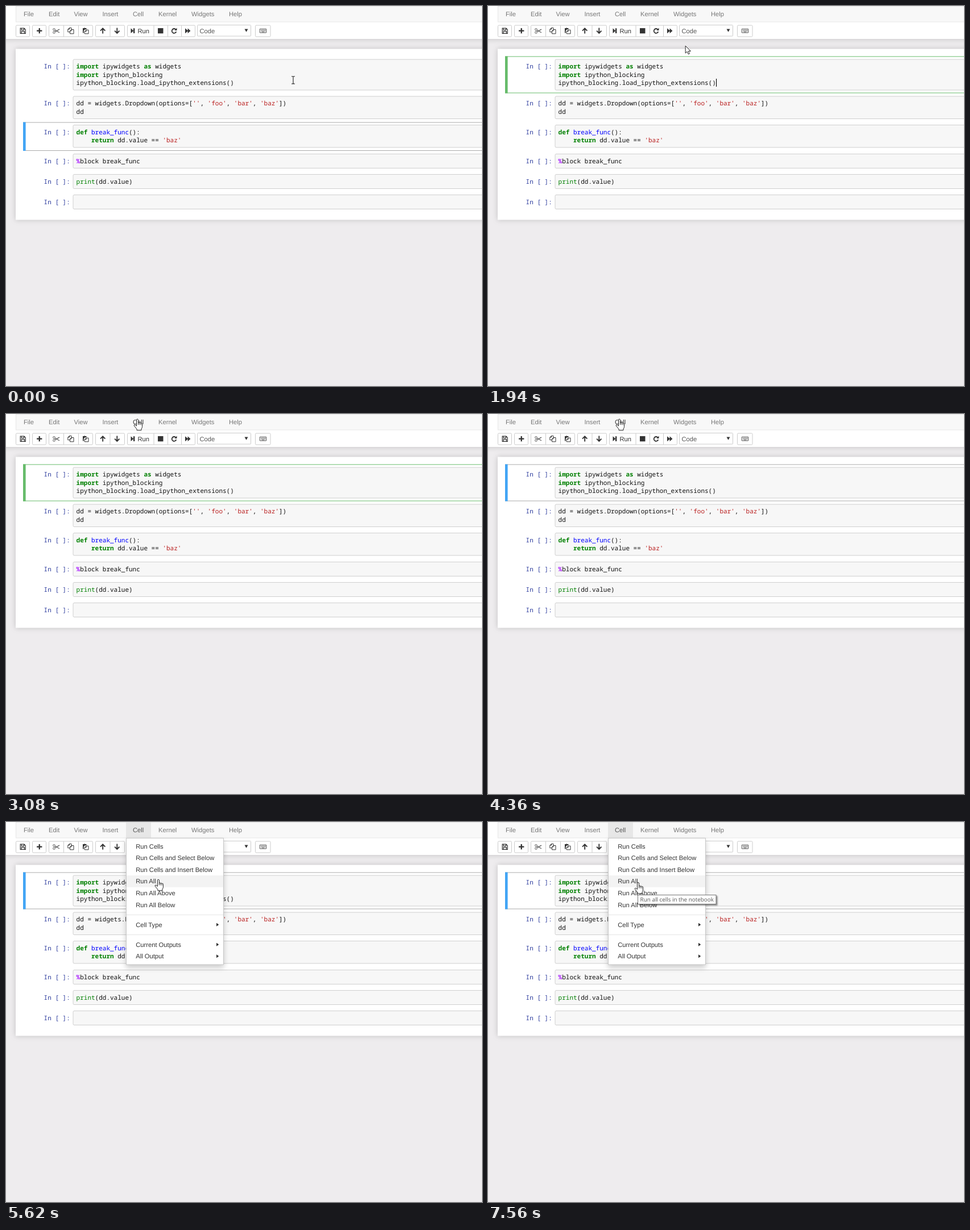
Recreate the animation shown at these times as an HTML page. Size 837 px wide and 669 px high, loop 8 s.

```html
<!DOCTYPE html>
<html lang="en">
<head>
<meta charset="utf-8">
<title>Notebook: run all cells</title>
<style>
html, body { margin: 0; width: 100%; height: 100%; overflow: hidden; background: #eeecee; }
svg { display: block; }
text { font: 11.2px "Liberation Sans", Arial, sans-serif; fill: #333; white-space: pre; text-rendering: geometricPrecision; }
.code { font: 11px "Noto Sans Mono", "DejaVu Sans Mono", monospace; fill: #111; }
.prompt { fill: #303f9f; }
.kw { fill: #008000; font-weight: bold; }
.fn { fill: #00f; }
.str { fill: #ba2121; }
.magic { fill: #a2f; font-weight: bold; }
.bi { fill: #008000; }
.menu { fill: #777; }
.tip { font: 9.9px "Open Sans", "Noto Sans", sans-serif; fill: #575757; }
.shade { filter: drop-shadow(0 0 5px rgba(87,87,87,.3)); }
.drop { filter: drop-shadow(0 5px 5px rgba(0,0,0,.2)); }
.tipbox { filter: drop-shadow(2px 2px 1px rgba(0,0,0,.45)); }
</style>
</head>
<body>
<svg id="stage" width="837" height="669" viewBox="0 0 837 669"></svg>
<script>
const stage = document.getElementById('stage');
const LOOP = 8000;

function el(parent, name, attrs, content) {
  const e = document.createElementNS('http://www.w3.org/2000/svg', name);
  for (const k in attrs) e.setAttribute(k, attrs[k]);
  if (content !== undefined) e.textContent = content;
  parent.appendChild(e);
  return e;
}
const group = (parent = stage, attrs = {}) => el(parent, 'g', attrs);
const rect = (p, x, y, width, height, fill, more = {}) =>
  el(p, 'rect', { x, y, width, height, fill, ...more });
const path = (p, d, more = {}) => el(p, 'path', { d, ...more });
const label = (p, x, y, s, cls = '') => el(p, 'text', { x, y, class: cls }, s);
const show = (e, on) => e.setAttribute('visibility', on ? 'visible' : 'hidden');

// Page and notebook sheet
rect(stage, 0, 0, 837, 669, '#eeecee');
rect(stage, 17, 75.5, 900, 301, '#fff', { class: 'shade' });

// Selection frames
function frame(y, h, bar, line) {
  const g = group();
  rect(g, 30.5, y + .5, 900, h - 1, '#fff', { stroke: line });
  rect(g, 30, y, 4.6, h, bar);
  return g;
}
const third = frame(204.5, 50.5, '#42a5f5', '#ababab');
const edit = frame(88.5, 65, '#66bb6a', '#66bb6a');
const first = frame(88.5, 65, '#42a5f5', '#ababab');

// Cells: top, height, lines of "class:text" tokens
const cells = [
  [94, 54, [
    ['kw:import', ':' + ' ipywidgets ', 'kw:as', ': widgets'],
    ['kw:import', ': ipython_blocking'],
    [':ipython_blocking.load_ipython_extensions()']]],
  [159, 39.5, [
    [':dd = widgets.Dropdown(options=[', "str:''", ':, ', "str:'foo'", ':, ', "str:'bar'", ':, ', "str:'baz'", ':])'],
    [':dd']]],
  [209.5, 39.5, [
    ['kw:def', ': ', 'fn:break_func', ':():'],
    [':    ', 'kw:return', ': dd.value == ', "str:'baz'"]]],
  [260.5, 25, [['magic:%', ':block break_func']]],
  [296.5, 25, [['bi:print', ':(dd.value)']]],
  [332.5, 25, [[]]]
];
for (const [top, h, lines] of cells) {
  rect(stage, 118, top, 900, h, '#f7f7f7', { stroke: '#cfcfcf', rx: 2 });
  label(stage, 66.6, top + 16, 'In [ ]:', 'code prompt');
  lines.forEach((tokens, i) => {
    const t = label(stage, 123.6, top + 16 + i * 14.55, '', 'code');
    for (const token of tokens) {
      const cut = token.indexOf(':');
      el(t, 'tspan', { class: token.slice(0, cut) }, token.slice(cut + 1));
    }
  });
}
const caret = rect(stage, 401, 128, 1.1, 14, '#000');

// Header
rect(stage, -20, -20, 880, 78, '#fff', { class: 'shade' });
rect(stage, 17.5, .5, 900, 27.5, '#f8f8f8', { stroke: '#e7e7e7' });
const openTab = rect(stage, 211, 1, 44, 27, '#e7e7e7');
const menus = {};
[['File', 31], ['Edit', 75], ['View', 119.5], ['Insert', 169.5], ['Cell', 223],
 ['Kernel', 268], ['Widgets', 326], ['Help', 392]]
  .forEach(([name, x]) => menus[name] = label(stage, x, 18, name, 'menu'));

// Toolbar
function buttons(x, w, splits = []) {
  rect(stage, x + .5, 34, w - 1, 20, '#fff', { stroke: '#ccc', rx: 1.5 });
  for (const s of splits) rect(stage, s, 34, 1, 20, '#ccc');
}
buttons(17, 25);
buttons(46, 25);
buttons(75, 78, [101, 127]);
buttons(157, 52, [182.5]);
buttons(213, 120, [259.5, 284, 308]);
buttons(438, 27.5);
rect(stage, 336.5, 33.5, 94, 19.5, '#fff', { stroke: '#ccc', rx: 1 });
label(stage, 340.5, 48, 'Code').style.fill = '#555';
label(stage, 231.5, 47.5, 'Run');

const solid = d => path(stage, d, { fill: '#333' });
const line = (d, w = 1.2, c = '#333') => path(stage, d, { fill: 'none', stroke: c, 'stroke-width': w });
line('M25.2 39.2h6.8l2.3 2.3v6.8h-9.1zM27.3 39.2v3.2h4.2v-3.2M27.2 48.3v-3.6h5.2v3.6');
solid('M57.6 39h2.3v3.5h3.5v2.3h-3.5v3.5h-2.3v-3.5h-3.5v-2.3h3.5z');
line('M86 42.5l8 4.2M86 45.3l8-4.2', 1.2, '#555');
for (const cy of [41.3, 46.5]) el(stage, 'circle', { cx: 84.5, cy, r: 1.8, fill: 'none', stroke: '#555' });
line('M111.5 38.5h3.5v3M108.8 41l2.7-2.5v2.5zM108.8 41v4.7h3.7M115 41.5h4v7.3h-6.5v-5zM115 41.5v2.3h-2.5', 1);
solid('M135 39h2q1-1.5 2.5 0h2v2.2h-2.8l-2 2.2v4.1H135z');
line('M141.2 42.2h3.8v6.6h-6.8v-4zM141.2 42.2v2.6h-3', 1);
line('M170.2 48.6v-9M166 43.6l4.2-4.2l4.2 4.2M195.3 38.6v9M191.1 43.6l4.2 4.2l4.2-4.2', 1.9);
solid('M219.5 39.3l4.5 4.2v-4.2h2.3v8.8h-2.3v-4.2l-4.5 4.2z');
solid('M267 39h9.5v9.3h-9.5z');
line('M298.3 41.1a3.9 3.9 0 1 0 1 4', 1.8);
solid('M296.3 42.9h4.2v-4.3z');
solid('M315 39.2l4.6 4v-4l4.8 4.5l-4.8 4.5v-4l-4.6 4z');
solid('M419.5 40.5h6l-3 5.2z');
line('M446.3 40.4h11.3v6.6h-11.3z', 1, '#555');
line('M448 42.4h8.5M448 44h8.5', .9, '#777');
line('M449.5 45.7h5', .9, '#555');

// Cell menu
const drop = group();
rect(drop, 211.5, 28.5, 171, 222.5, '#fff', { stroke: '#c8c8c8', class: 'drop' });
const hot = rect(drop, 212, 53, 170, 20.6, '#f3f3f3');
['Run Cells', 'Run Cells and Select Below', 'Run Cells and Insert Below',
 'Run All', 'Run All Above', 'Run All Below']
  .forEach((s, i) => label(drop, 228.2, 46.5 + 20.6 * i, s));
[['Cell Type', 184.7], ['Current Outputs', 219.7], ['All Output', 240.3]].forEach(([s, y]) => {
  label(drop, 228.2, y, s);
  path(drop, `M370 ${y - 7}l4.3 3l-4.3 3z`, { fill: '#333' });
});
for (const y of [163, 198]) rect(drop, 212, y, 170, 1, '#e5e5e5');

// Tooltip
const tip = group();
rect(tip, 263.5, 128.5, 137.5, 16, '#fff', { stroke: '#767676', class: 'tipbox' });
label(tip, 267.6, 140, 'Run all cells in the notebook', 'tip');

// Pointers, each with its hot spot at 0,0
const beam = group();
path(beam, 'M-3-6.5h2.2l.8.7l.8-.7H3M0-6V6M-3 6.5h2.2l.8-.7l.8.7H3', { fill: 'none', stroke: '#222', 'stroke-width': 1.1 });
const arrow = group();
path(arrow, 'M.5.3V13.2l3-2.8l2.1 4.6l2.1-.9l-2-4.5h4z', { fill: '#fff', stroke: '#222' });
const hand = group();
path(hand, 'M-1.5 12V1.5a1.5 1.5 0 0 1 3 0V7a1.2 1.2 0 0 1 2.4.3a1.2 1.2 0 0 1 2.4.5a1.1 1.1 0 0 1 2.2.6V13.5q0 2-1.5 3.5V19.5H-1V17.5L-5.5 12q-1-2 .8-2.3z',
  { fill: '#fff', stroke: '#222', 'stroke-linejoin': 'round' });
path(hand, 'M1.5 7v3M3.9 7.5v2.7M6.3 8v2.3', { stroke: '#222', 'stroke-width': .9 });

// Pointer stops: time, x, y
const stops = [
  [0, 505, 130.5], [1540, 505, 130.5], [1940, 347, 70], [2260, 269, 25], [2360, 269, 25],
  [2500, 261, 19], [3080, 231, 9], [4420, 231, 9], [5060, 257, 80.5], [5160, 257, 80.5],
  [5900, 273, 111], [6020, 273, 111], [6440, 264, 106.5], [LOOP, 264, 106.5]
];
function slope(i, k) {
  const a = stops[i - 1], b = stops[i], c = stops[i + 1];
  if (!a || !c || a[k] === b[k] || b[k] === c[k]) return 0;
  return (c[k] - a[k]) / (c[0] - a[0]);
}
function pointer(t) {
  let i = 0;
  while (i < stops.length - 2 && t >= stops[i + 1][0]) i++;
  const a = stops[i], b = stops[i + 1], d = b[0] - a[0];
  const u = (t - a[0]) / d, v = 1 - u;
  return [1, 2].map(k =>
    v * v * (1 + 2 * u) * a[k] + u * u * (3 - 2 * u) * b[k] +
    d * u * v * (v * slope(i, k) - u * slope(i + 1, k)));
}

// Start time of each highlighted menu row
const rows = [4720, 4860, 5160, 5440];

function draw(t) {
  show(third, t < 960);
  show(edit, t >= 960 && t < 4080);
  show(first, t >= 4080);
  show(caret, (t >= 960 && t < 2430) || (t >= 3900 && t < 4080));

  const open = t >= 4380;
  show(openTab, open);
  show(drop, open);
  menus.Kernel.style.fill = t >= 2380 && t < 2680 ? '#333' : '';
  menus.Cell.style.fill = open ? '#555' : t >= 2680 ? '#333' : '';
  const row = rows.filter(s => t >= s).length - 1;
  show(hot, row >= 0);
  hot.setAttribute('y', 32.3 + 20.6 * Math.max(row, 0));
  tip.setAttribute('opacity', Math.min(1, Math.max(0, (t - 6720) / 760)));

  const [x, y] = pointer(t);
  const now = t >= 2200 ? hand : y > 94 ? beam : arrow;
  for (const c of [beam, arrow, hand]) show(c, c === now);
  now.setAttribute('transform', `translate(${x.toFixed(2)} ${y.toFixed(2)})`);
}

const start = performance.now();
function tick() {
  draw((performance.now() - start) % LOOP);
  requestAnimationFrame(tick);
}
tick();
</script>
</body>
</html>
```
